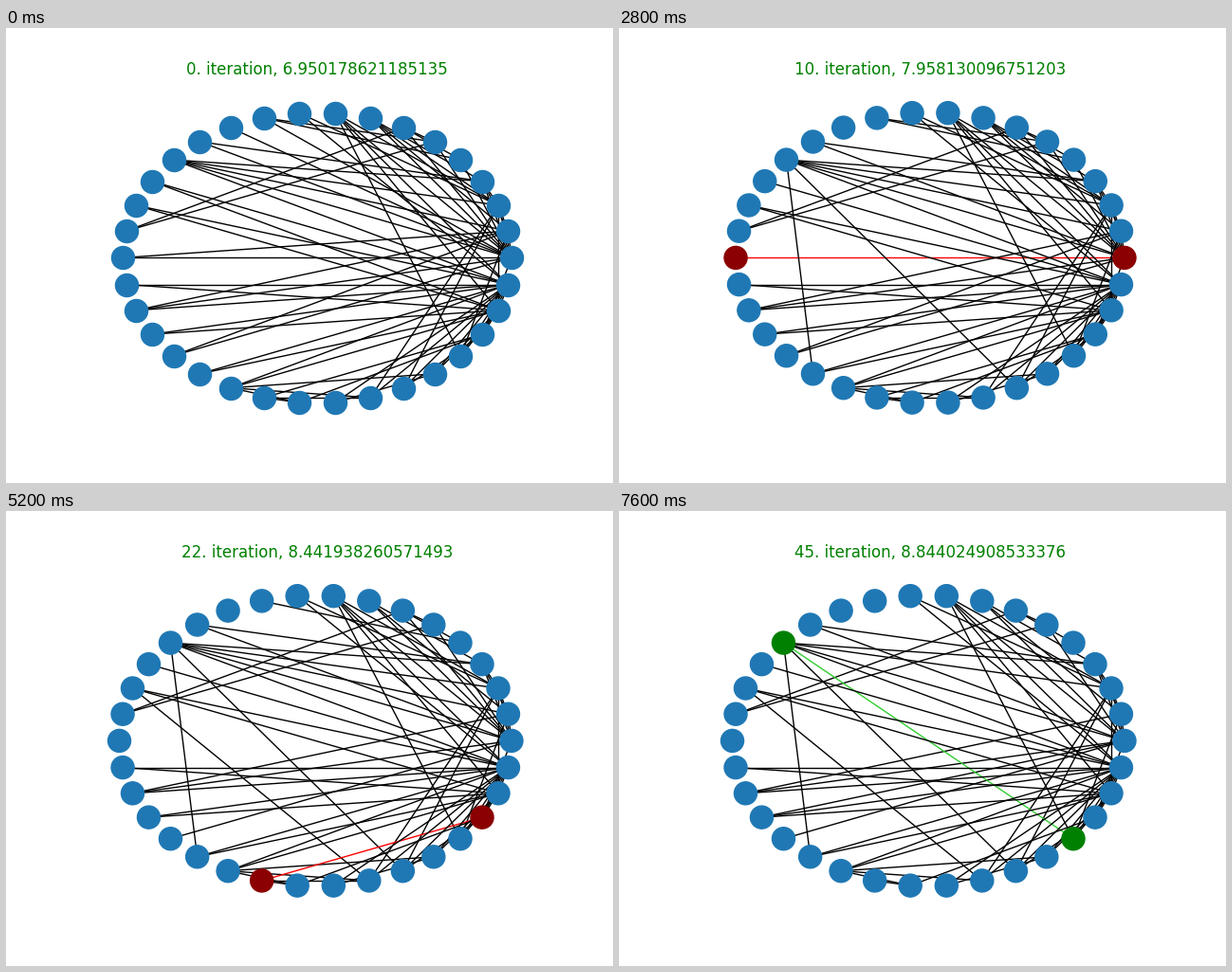
These frames come from a looping animation (640x480 px, 8 s). A matplotlib script:

```python
import matplotlib.pyplot as plt
import numpy as np
from matplotlib.animation import FuncAnimation
from matplotlib.collections import LineCollection

NODES = 34
BLUE = "#1f78b4"

NEIGHBOURS = {
    0: [1, 2, 3, 4, 5, 6, 7, 8, 10, 11, 12, 13, 17, 19, 21, 31],
    1: [2, 3, 7, 13, 17, 19, 21, 30],
    2: [3, 7, 8, 9, 13, 27, 28, 32],
    3: [7, 12, 13],
    4: [6, 10],
    5: [6, 10, 16],
    6: [16],
    8: [30, 32, 33],
    9: [33],
    13: [33],
    14: [32, 33],
    15: [32, 33],
    18: [32, 33],
    19: [33],
    20: [32, 33],
    22: [32, 33],
    23: [25, 27, 29, 32, 33],
    24: [25, 27, 31],
    25: [31],
    26: [29, 33],
    27: [33],
    28: [31, 33],
    29: [32, 33],
    30: [32, 33],
    31: [32, 33],
    32: [33],
}

# (iteration, score, edge, added)
STEPS = [
    (0, "6.950178621185135", None, False),
    (1, "7.153460287319482", (1, 17), False),
    (3, "7.324817590266371", (13, 28), True),
    (4, "7.5290416387250914", (0, 10), False),
    (6, "7.708505998595642", (0, 11), False),
    (8, "7.793162840537926", (14, 32), False),
    (9, "7.861940375218463", (13, 22), True),
    (10, "7.958130096751203", (0, 17), False),
    (12, "8.046283719502846", (0, 4), False),
    (13, "8.127576022020513", (1, 21), False),
    (15, "8.215390648271934", (5, 10), False),
    (17, "8.301817041156646", (15, 27), True),
    (19, "8.372604918350267", (2, 7), False),
    (22, "8.441938260571493", (24, 31), False),
    (24, "8.508261739420586", (0, 6), False),
    (27, "8.572298801659784", (1, 13), False),
    (29, "8.643071592836417", (24, 27), False),
    (34, "8.712594830261759", (4, 10), False),
    (39, "8.780416297350842", (0, 20), True),
    (45, "8.844024908533376", (13, 30), True),
]

angles = 2 * np.pi * np.arange(NODES) / NODES
POS = np.column_stack([np.cos(angles), np.sin(angles)])

fig, ax = plt.subplots(figsize=(6.4, 4.8), dpi=100)


def edges_at(step):
    """Edges visible at a step; an edge being removed is still shown."""
    edges = [(u, v) for u, row in NEIGHBOURS.items() for v in row]
    for i, (_, _, edge, added) in enumerate(STEPS[1:step + 1], 1):
        if added:
            edges.append(edge)
        elif i < step:
            edges.remove(edge)
    return sorted(edges, key=lambda e: e[0])


def limits(used, everything):
    """Padded span of the linked nodes, plus the usual axes margin."""
    pad = 0.05 * np.ptp(used)
    low = min(used.min() - pad, everything.min())
    high = max(used.max() + pad, everything.max())
    margin = 0.05 * (high - low)
    return low - margin, high + margin


def draw(step):
    iteration, score, changed, added = STEPS[step]
    node_color, edge_color = ("green", "limegreen") if added else ("darkred", "red")
    edges = edges_at(step)

    ax.clear()
    ax.set_axis_off()
    ax.add_collection(LineCollection(
        [POS[list(e)] for e in edges],
        colors=[edge_color if e == changed else "black" for e in edges],
        linewidths=1, zorder=1))

    colors = BLUE
    if changed:
        colors = [node_color if n in changed else BLUE for n in range(NODES)]
    ax.scatter(POS[:, 0], POS[:, 1], s=300, c=colors, zorder=2)

    linked = POS[np.unique(edges)]
    ax.set_xlim(limits(linked[:, 0], POS[:, 0]))
    ax.set_ylim(limits(linked[:, 1], POS[:, 1]))
    ax.set_title(f"{iteration}. iteration, {score}", color="green")
    return []


anim = FuncAnimation(fig, draw, frames=len(STEPS), interval=400,
                     init_func=lambda: [], repeat=True, repeat_delay=0)
plt.show()
```
